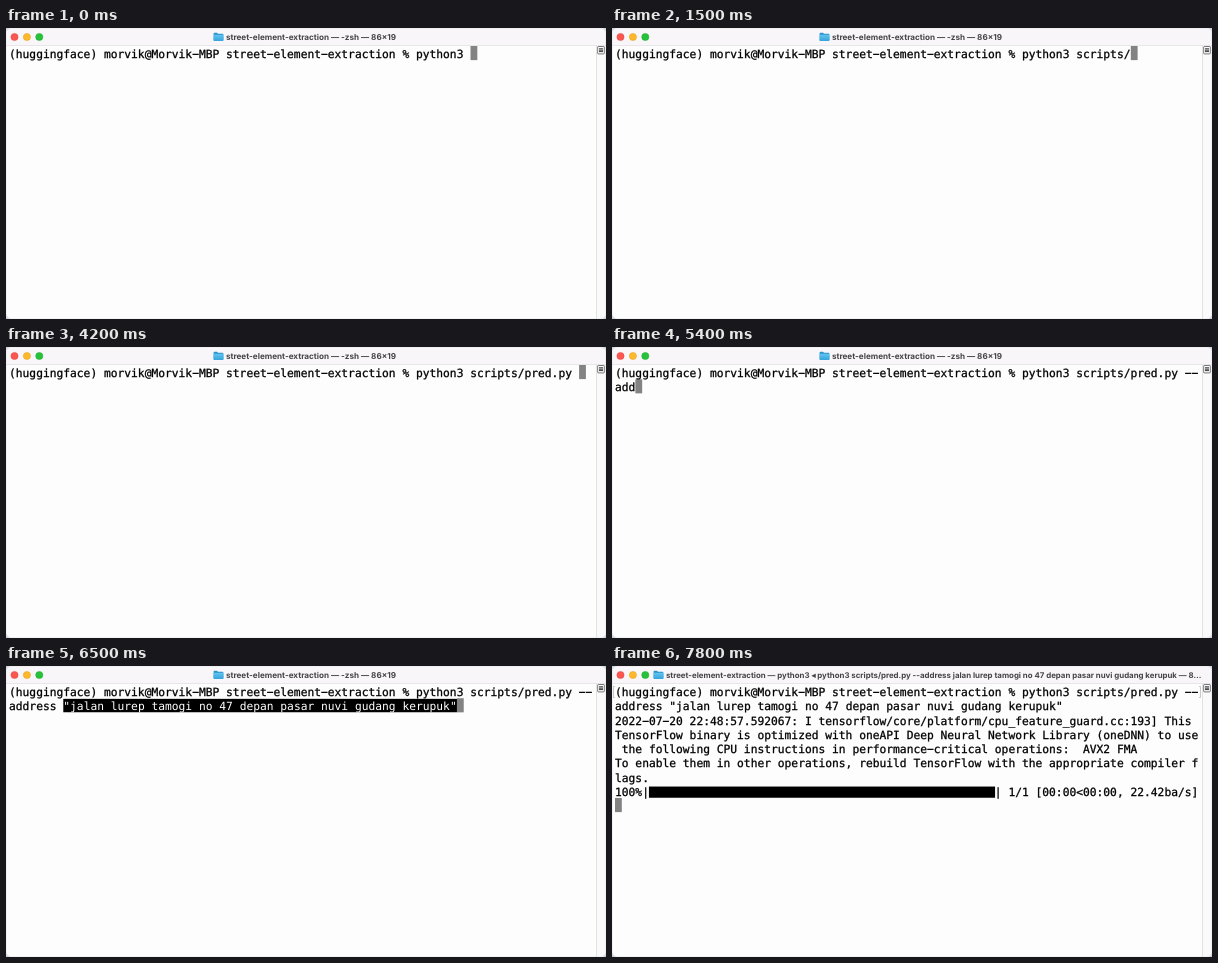
An HTML page that plays this animation: 600x291 px, repeating every 8 s.

```html
<!DOCTYPE html>
<html lang="en">
<head>
<meta charset="utf-8">
<title>Terminal session</title>
<style>
  html, body { margin: 0; width: 100%; height: 100%; overflow: hidden; background: #c9d3d9; }
  svg { display: block; width: 100vw; height: 100vh; }
  text { white-space: pre; text-rendering: geometricPrecision; }
  .mono { font: 11.273px "DejaVu Sans Mono", monospace; color: #000; fill: currentColor; stroke: currentColor; stroke-width: .28px; }
  .title { font: 700 8.14px Inter, sans-serif; fill: #454346; }
  .title.long { font-size: 7.87px; }
</style>
</head>
<body>
<svg viewBox="0 0 600 291">
  <defs>
    <clipPath id="frame"><rect width="600" height="291" rx="5.5"/></clipPath>
    <linearGradient id="folder" x2="0" y2="1">
      <stop offset="0" stop-color="#62c5f0"/>
      <stop offset="1" stop-color="#36a5dc"/>
    </linearGradient>
  </defs>
  <g clip-path="url(#frame)">
    <rect width="600" height="291" fill="#fdfdfd"/>
    <rect width="600" height="17.5" fill="#f9f6f9"/>
    <path d="M0 17.5H600" stroke="#e2dfe2" stroke-width=".7"/>
    <g stroke-width=".5">
      <circle cx="8.5" cy="9" r="3.6" fill="#fc5650" stroke="#e0443e"/>
      <circle cx="20.9" cy="9" r="3.6" fill="#fdb92b" stroke="#dea123"/>
      <circle cx="33.3" cy="9" r="3.6" fill="#27c13c" stroke="#1aab29"/>
    </g>
    <g id="heading">
      <path d="M0 5.6q0-.8.8-.8H3.4l1 1H9q.8 0 .8.9V12q0 .9-.9.9H.9Q0 12.9 0 12Z" fill="#2b94cc"/>
      <rect y="6.8" width="9.8" height="6.1" rx=".9" fill="url(#folder)"/>
      <text id="title" class="title" x="12.3" y="11.8"></text>
    </g>
    <rect x="590" y="18" width="10" height="273" fill="#fafafa"/>
    <path d="M590.5 18V291" stroke="#e2e2e2"/>
    <rect x="591.7" y="18.5" width="6.6" height="7.4" rx=".6" fill="#fff" stroke="#555" stroke-width=".8"/>
    <path d="M593 20.8H597M593 22.2H597M593 23.6H597" stroke="#222" stroke-width=".9"/>
    <rect id="cursor" width="6.8" height="14.1" fill="#838383"/>
    <rect id="selection" height="13.4" fill="#000"/>
    <rect id="bar" height="11.2" fill="#000"/>
    <path id="marks" d="M3 20.5H1.5V31.5H3M587 20.5H588.5V31.5H587" fill="none" stroke="#b0b0b0" stroke-width=".7"/>
    <g id="lines"></g>
  </g>
  <rect x=".25" y=".25" width="599.5" height="290.5" rx="5.5" fill="none" stroke="#dcdfe1" stroke-width=".5"/>
</svg>
<script>
const LOOP = 8000, LEFT = 3, TOP = 18, CELL = 6.787, ROW = 14.25, COLS = 86;
const address = "jalan lurep tamogi no 47 depan pasar nuvi gudang kerupuk";
const prompt = "(huggingface) morvik@Morvik-MBP street-element-extraction % python3 ";
const typed = "scripts/pred.py --address ";
const log = [
  "2022-07-20 22:48:57.592067: I tensorflow/core/platform/cpu_feature_guard.cc:193] This ",
  "TensorFlow binary is optimized with oneAPI Deep Neural Network Library (oneDNN) to use",
  " the following CPU instructions in performance-critical operations:  AVX2 FMA",
  "To enable them in other operations, rebuild TensorFlow with the appropriate compiler f",
  "lags."
];
const progress = "100%|" + " ".repeat(51) + "| 1/1 [00:00<00:00, 22.42ba/s]";

// [time in ms, characters typed]
const keys = [
  [0, 0], [500, 2], [700, 3], [800, 4], [1000, 5], [1200, 6], [1300, 7], [1500, 8],
  [2200, 9], [2300, 11], [2500, 12], [2700, 13], [3100, 14], [3500, 15], [4200, 16],
  [4900, 17], [5000, 18], [5100, 19], [5200, 20], [5400, 21], [5600, 22], [5700, 23],
  [5900, 24], [6000, 25], [6100, 26]
];
const PASTE = 6500, ENTER = 7300, RUN = 7700, DONE = 7800;

const el = id => document.getElementById(id);
const colX = col => LEFT + col * CELL;
const rowY = row => TOP + row * ROW;
const show = (node, on) => node.setAttribute("visibility", on ? "visible" : "hidden");
const move = (node, x, y) => { node.setAttribute("x", x); node.setAttribute("y", y); };
const setText = (node, text) => { if (node.textContent !== text) node.textContent = text; };
// The terminal face has wide hyphens; the minus glyph has that width.
const wideHyphens = text => text.replaceAll("-", "\u2212");

function addText(x, row) {
  const node = document.createElementNS("http://www.w3.org/2000/svg", "text");
  node.setAttribute("class", "mono");
  move(node, x, rowY(row) + 12);
  el("lines").append(node);
  return node;
}

const rows = Array.from({ length: 8 }, (_, row) => addText(LEFT, row));
const quoted = `"${address}"`;
const pasted = addText(colX(8), 1);
move(el("selection"), colX(8), rowY(1) + .6);
el("selection").setAttribute("width", quoted.length * CELL);
move(el("bar"), colX(5), rowY(7) + 2.8);
el("bar").setAttribute("width", 51 * CELL);

function draw(t) {
  const count = keys.findLast(([time]) => time <= t)[1];
  const command = prompt + typed.slice(0, count);
  const isPasted = t >= PASTE, entered = t >= ENTER, running = t >= RUN, done = t >= DONE;
  const selected = isPasted && !entered;

  const screen = [command.slice(0, COLS), command.slice(COLS)];
  if (running) screen.push(...log);
  if (done) screen.push(progress);
  rows.forEach((node, i) => setText(node, wideHyphens(screen[i] || "")));
  setText(pasted, isPasted ? quoted : "");
  pasted.style.color = selected ? "#fff" : "#000";
  pasted.style.strokeWidth = selected ? 0 : "";

  const end = command.length + (isPasted ? quoted.length : 0);
  const [col, row] = entered ? [0, screen.length] : [end % COLS, Math.floor(end / COLS)];
  move(el("cursor"), colX(col), rowY(row));

  show(el("selection"), selected);
  show(el("bar"), done);
  show(el("marks"), entered);
  el("heading").setAttribute("transform", `translate(${running ? 41.6 : 207.6})`);
  el("title").classList.toggle("long", running);
  setText(el("title"), "street-element-extraction — " + (running
    ? `python3 ◂ python3 scripts/pred.py --address ${address} — 8…`
    : "-zsh — 86×19"));
}

const start = performance.now();
function tick() {
  draw((performance.now() - start) % LOOP);
  requestAnimationFrame(tick);
}
tick();
</script>
</body>
</html>
```
